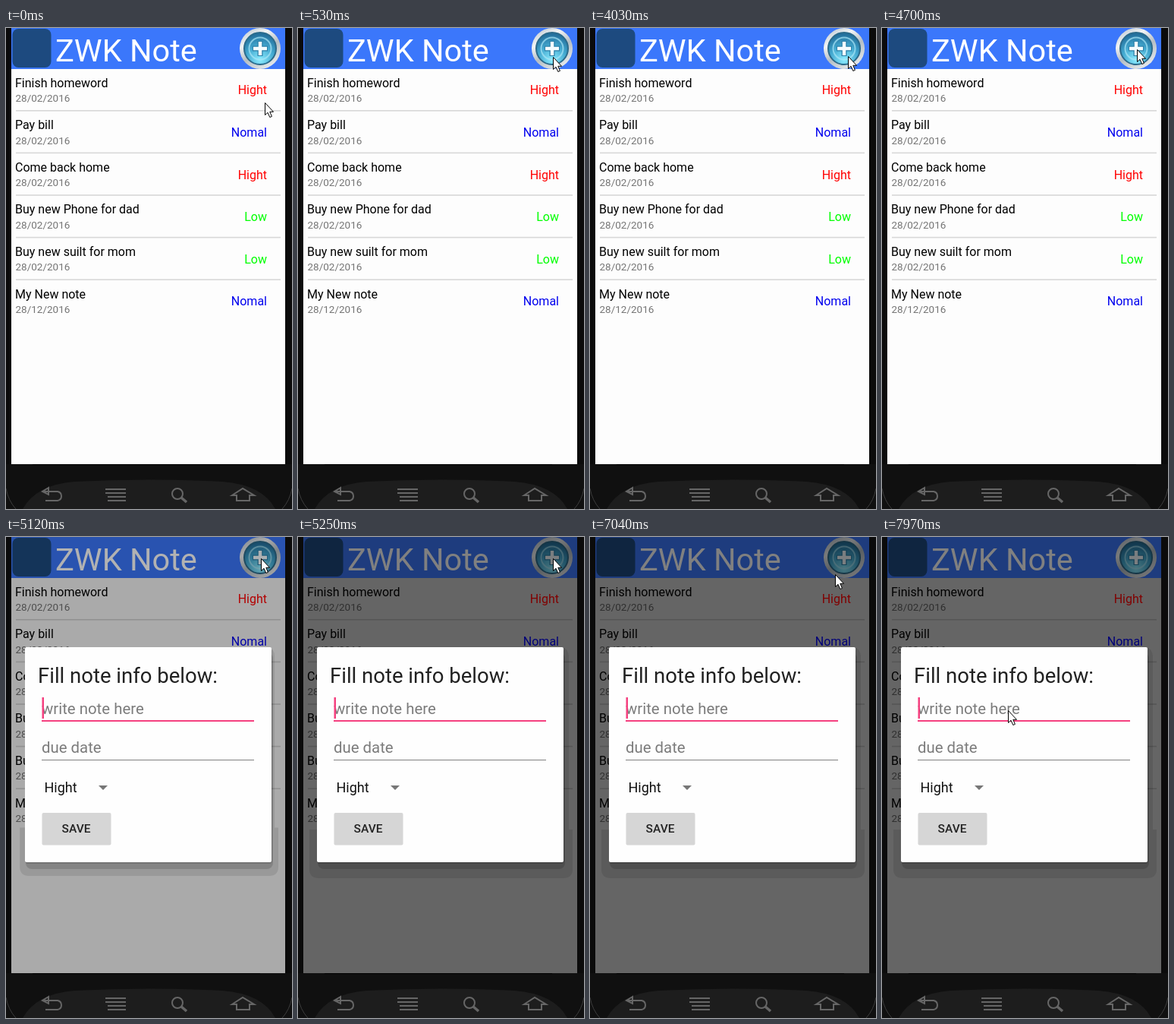
These frames come from a looping animation (377 by 633 pixels, 8000 ms). An HTML page:

```html
<!DOCTYPE html>
<html lang="en">
<head>
<meta charset="utf-8">
<title>Notes</title>
<style>
html, body { margin: 0; width: 100%; height: 100%; overflow: hidden; background: #0b0b0b; }
svg { display: block; width: 377px; height: 633px; font-family: Roboto, sans-serif; }
.keys { fill: none; stroke: #666; stroke-width: 2; }
</style>
</head>
<body>
<svg viewBox="0 0 377 633">
  <defs>
    <linearGradient id="silver" x2=".6" y2="1">
      <stop offset="0" stop-color="#aebcc8"/><stop offset=".35" stop-color="#f2f4f5"/>
      <stop offset=".65" stop-color="#b5bec4"/><stop offset="1" stop-color="#e2e6e8"/>
    </linearGradient>
    <radialGradient id="glass" cy=".85" r=".8">
      <stop offset="0" stop-color="#8cecff"/><stop offset=".55" stop-color="#43a9d0"/>
      <stop offset="1" stop-color="#236f9c"/>
    </radialGradient>
  </defs>

  <!-- Phone body and keys -->
  <rect width="377" height="633" fill="#0b0b0b"/>
  <rect y="574" width="377" height="59" fill="#101010"/>
  <path d="M35 574.5H335" stroke="#000"/>
  <path d="M22 633Q40 601 90 597Q188 592 285 597Q338 601 355 633Z" fill="#1d1d1d"/>
  <path d="M0 606Q3 622 13 633M377 606Q374 622 364 633" fill="none" stroke="#3c3c3c"/>
  <g class="keys">
    <path d="M56 605L48 610L56 614ZM48 610H68Q73 611 73 616T68 622H52"/>
    <path d="M131 607H158M131 612H158M134 617H158M134 622H158"/>
    <circle cx="226" cy="613" r="7"/><path d="M231 618L238 624" stroke-width="3.5"/>
    <path d="M298 615L312 606L327 615H321V622H304V615Z"/>
  </g>

  <!-- Notes screen -->
  <rect x="7" y="54" width="361" height="520" fill="#fdfdfd"/>
  <g id="rows"></g>
  <rect id="listDim" x="7" y="54" width="361" height="520"/>
  <g id="vivid">
    <g id="labels" font-size="16" text-anchor="end"></g>
    <rect x="7" width="361" height="54" fill="#3b77fb"/>
    <rect x="8.5" y="1" width="51" height="51" rx="8" fill="#1d4a7f"/>
    <text x="65" y="44" font-size="41.5" fill="#fff">ZWK Note</text>
    <circle cx="335" cy="27" r="27" fill="url(#silver)"/>
    <circle cx="335" cy="27" r="21" fill="url(#glass)" stroke="#2b6b8c" stroke-width="2"/>
    <circle cx="335" cy="27" r="14.5" fill="none" stroke="#a9e6f7" stroke-width="2" opacity=".7"/>
    <path d="M335 17V37M325 27H345" stroke="#2a7fa8" stroke-width="7"/>
    <path d="M335 18V36M326 27H344" stroke="#f4fcff" stroke-width="4.5"/>
  </g>

  <!-- New note dialog -->
  <g id="dialog">
    <path id="halo" d="M348 145Q357 147 357 158V385H362V437Q362 449 350 449H27Q15 449 15 437V385H348Z" opacity=".1"/>
    <rect x="26" y="152" width="326" height="285" rx="8" opacity=".14"/>
    <rect x="25" y="147" width="326" height="283" rx="4" opacity=".12"/>
    <rect x="25" y="145" width="325" height="283" rx="2" fill="#fefefe"/>
    <text x="42" y="192" font-size="27.5" fill="#212121">Fill note info below:</text>
    <g font-size="20.4" fill="#7c7c7c">
      <text x="47" y="233">write note here</text>
      <text x="47" y="284">due date</text>
    </g>
    <rect x="47" y="241" width="280" height="2" fill="#f5407f"/>
    <rect id="caret" x="47.5" y="211" width="2.5" height="28" fill="#f5407f"/>
    <rect x="47" y="293" width="280" height="1" fill="#808080"/>
    <text x="50.5" y="336" font-size="18" fill="#111">Hight</text>
    <path d="M122 327H134L128 333Z" fill="#777"/>
    <rect x="47.5" y="363" width="91" height="42.5" rx="2" fill="#d6d6d6"/>
    <text x="92.5" y="389" font-size="15.5" font-weight="500" text-anchor="middle" fill="#222">SAVE</text>
  </g>

  <path id="pointer" d="M.5.5V16.5L4 13.3L6.8 19.5L9.400 18.4L6.8 12.3H11.5Z" fill="#fff" stroke="#000"/>
</svg>
<script>
const LOOP = 8000, STEP = 135, LEAD = 50;
const OPEN = 38, SETTLED = 39, BLINK = 3.6;
const $ = id => document.getElementById(id);

const colors = { Hight: '#f00', Nomal: '#00e', Low: '#0f0' };
const notes = [
  ['Finish homeword', 'Hight'], ['Pay bill', 'Nomal'], ['Come back home', 'Hight'],
  ['Buy new Phone for dad', 'Low'], ['Buy new suilt for mom', 'Low'],
  ['My New note', 'Nomal', '28/12/2016']
];

notes.forEach(([title, level, date = '28/02/2016'], i) => {
  const y = i * 55.6;
  $('rows').innerHTML += `
    <text x="12" y="${77.6 + y}" font-size="16">${title}</text>
    <text x="12.5" y="${97 + y}" font-size="13.5" fill="#757575">${date}</text>` +
    (i < notes.length - 1 ? `<rect x="13" y="${108 + y}" width="349" height="1.6" fill="#d8d8d8"/>` : '');
  $('labels').innerHTML += `<text x="344" y="${87.3 + y}" fill="${colors[level]}">${level}</text>`;
});

// Pointer stops: [step, x, y], eased in between.
const stops = [
  [0, 341, 98], [6, 334, 17], [29, 334, 17], [31, 345, 57], [32, 345, 37], [35, 336, 28],
  [46, 336, 28], [48, 330, 29], [51, 329, 32], [52, 323, 49], [55, 213, 241],
  [56, 188, 257], [59, 166, 228]
];

function pointerAt(step) {
  const next = stops.findIndex(s => s[0] > step);
  if (next < 0) return stops.at(-1).slice(1);
  const [s0, ...from] = stops[next - 1], [s1, ...to] = stops[next];
  const p = (step - s0) / (s1 - s0), ease = p * p * (3 - 2 * p);
  return from.map((v, i) => Math.round(v + (to[i] - v) * ease));
}

function draw(time) {
  // The screen refreshes in steps, so the pointer jumps rather than glides.
  const step = Math.floor((time % LOOP + LEAD) / STEP);
  const open = step >= OPEN, settled = step >= SETTLED;
  const blinks = Math.floor((step - OPEN + .65) / BLINK);

  $('listDim').setAttribute('opacity', settled ? .6 : open ? .33 : 0);
  $('vivid').style.filter = `brightness(${settled ? .5 : open ? .7 : 1})`;
  $('dialog').style.display = open ? '' : 'none';
  $('halo').setAttribute('transform', settled ? '' : 'translate(3.5 1) scale(.982 .991)');
  $('caret').style.display = blinks % 2 ? 'none' : '';
  $('pointer').setAttribute('transform', `translate(${pointerAt(step)})`);
}

const start = performance.now();
function tick() {
  draw(performance.now() - start);
  requestAnimationFrame(tick);
}
tick();
</script>
</body>
</html>
```
